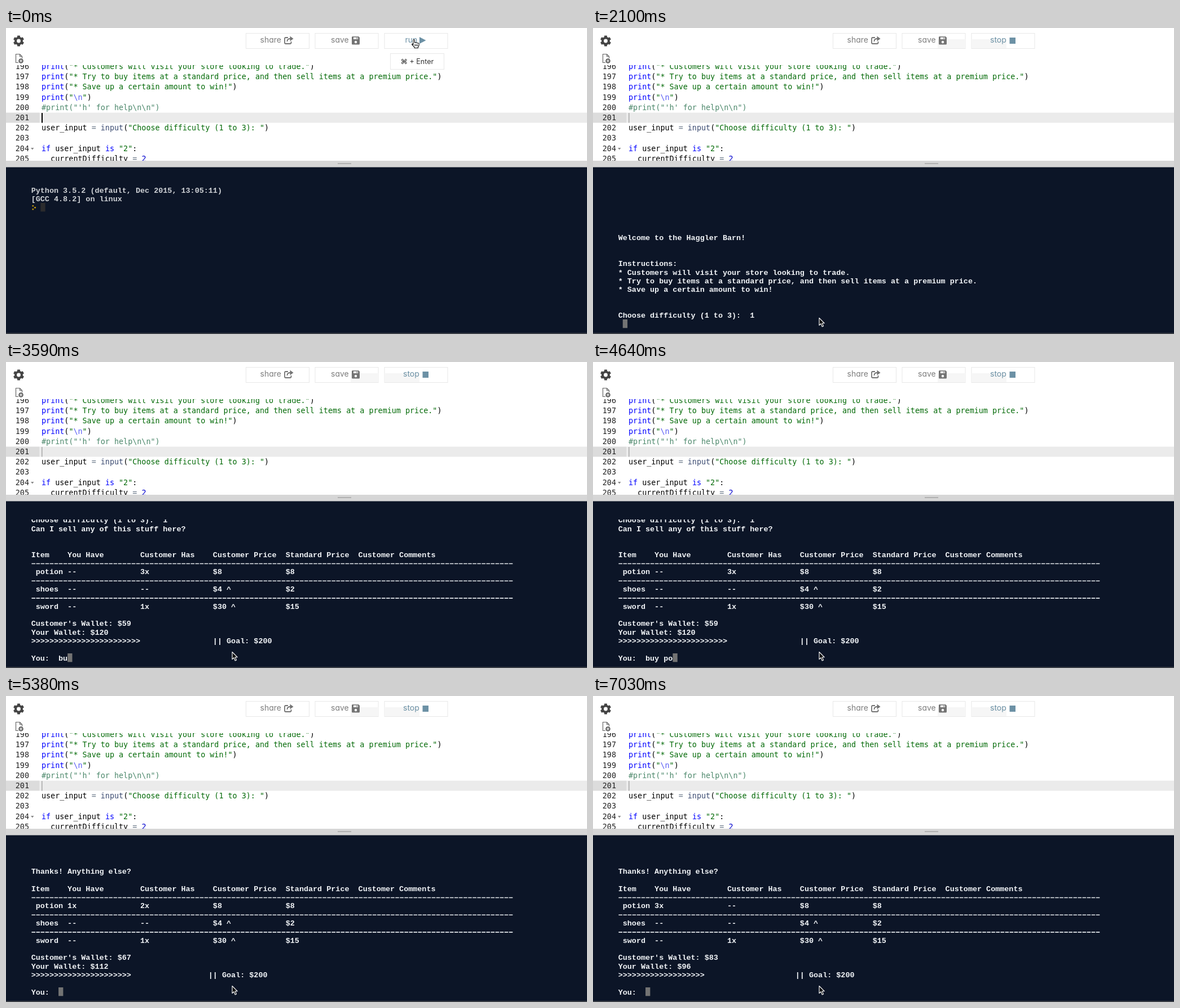
Animation, 1030 px wide and 544 px high, one loop 8 s. Source, as an HTML page:

```html
<!DOCTYPE html>
<html lang="en">
<head>
<meta charset="utf-8">
<title>Trading game in a code editor</title>
<style>
  html, body { margin: 0; width: 100%; height: 100%; overflow: hidden; background: #fff; }
  svg { display: block; width: 100vw; height: 100vh; }
  text { white-space: pre; }
  .code { font: 13.4px "DejaVu Sans Mono", monospace; fill: #000; }
  .num { text-anchor: end; fill: #222; }
  .key { fill: #00f; }
  .str { fill: #036a07; }
  .esc { fill: #585cf6; }
  .com { fill: #4c886b; }
  .fun { fill: #3c4c72; }
  .op { fill: #687687; }
  .lit { fill: #0000cd; }
  .term { font: bold 13.43px "Liberation Mono", monospace; fill: #f2f5f8; }
  .boot { fill: #cfd2d6; }
  .label { font: 14px Inter, sans-serif; font-feature-settings: "cv11"; fill: #7d7d7d; }
  .active { fill: #6c91a5; }
  .tip { font: 12.5px Inter, "DejaVu Sans", sans-serif; fill: #333; }
  .box { fill: #fff; stroke: #e8e8e8; }
</style>
</head>
<body>
<svg viewBox="0 0 1030 544" xmlns="http://www.w3.org/2000/svg">
  <defs>
    <clipPath id="editClip"><rect y="66" width="1030" height="170"/></clipPath>
    <clipPath id="termClip"><rect y="280" width="1030" height="262"/></clipPath>
  </defs>
  <rect width="1030" height="544" fill="#fff"/>

  <path id="gear" fill="#444" fill-rule="evenodd"/>
  <g fill="none" stroke="#666" stroke-width="1.2">
    <path d="M22 61.5H17.5V46.5H24.5L28.5 50.5V54M24.5 46.5V50.5H28.5"/>
    <circle cx="26.5" cy="58.5" r="4.3" fill="#666" stroke="none"/>
    <path d="M24 58.5H29M26.5 56V61" stroke="#fff"/>
  </g>

  <g class="box">
    <rect x="425.5" y="9.5" width="112" height="27"/>
    <rect x="548" y="9.5" width="112" height="27"/>
    <rect x="671" y="9.5" width="112" height="27"/>
  </g>
  <path id="shade" d="M611 20H660V36H611ZM671.5 20H733V36H671.5Z" fill="#f6f6f6"/>
  <text class="label" x="450.5" y="26">share</text>
  <g fill="none" stroke="#747474" stroke-width="1.8">
    <path d="M500 17H496Q494 17 494 19V26Q494 28 496 28H503.5Q505.5 28 505.5 26V24"/>
    <path d="M498.5 24Q498.5 19 504 19"/>
    <path d="M503.5 14.5L509.5 19L503.5 23.5Z" fill="#747474" stroke="none"/>
  </g>
  <text class="label" x="576" y="26">save</text>
  <path d="M614 15H625L627 17V28Q627 29.5 625.5 29.5H614.5Q613 29.5 613 28V16Z" fill="#747474"/>
  <path d="M616 16.5H624V20H616Z" fill="#fff"/>
  <path d="M621.5 17H623V19.5H621.5Z" fill="#747474"/>
  <circle cx="620" cy="25" r="2.2" fill="#fff"/>
  <g id="run">
    <text class="label active" x="707.5" y="26">run</text>
    <path d="M733 16L744.5 22L733 28Z" fill="#6c91a5"/>
  </g>
  <g id="stop">
    <text class="label active" x="704" y="26">stop</text>
    <rect x="738.5" y="17" width="10.5" height="11" fill="#6c91a5"/>
  </g>
  <g id="hint">
    <rect class="box" x="681.5" y="45.5" width="95" height="28"/>
    <text class="tip" x="699.5" y="63.5">⌘ + Enter</text>
  </g>

  <rect y="150.5" width="59" height="18" fill="#dcdcdc"/>
  <rect x="59" y="150.5" width="971" height="18" fill="#ebebeb"/>
  <g id="editor" clip-path="url(#editClip)"></g>
  <path d="M44 213H49.5L46.75 216.5Z" fill="#888"/>
  <rect id="caret" x="63" y="151" height="17.5"/>

  <rect y="236" width="1030" height="12" fill="#d6d6d6"/>
  <path d="M588 241H612" stroke="#8c8c8c"/>
  <rect y="247.5" width="1030" height="297" fill="#0c1527"/>
  <rect y="542" width="1030" height="2" fill="#3a3e45"/>
  <g id="terminal" clip-path="url(#termClip)"></g>

  <path id="hand" transform="translate(719 20)" fill="#fff" stroke="#111" stroke-width="1.1" stroke-linejoin="round"
    d="M3 9.5V1.8Q3 .5 4.2 .5T5.5 1.8V6Q6.5 5 8 6.3Q9.3 5.5 10.5 7Q13.3 6.3 13.3 9Q13.3 12 11.5 13.5V15.5H5V14L.8 9.5Q.3 8 1.5 8Z M6 9V12M8.3 9V12M10.5 9.3V12"/>
  <path id="arrow" fill="#111" stroke="#fff" stroke-width="1.1" stroke-linejoin="round"
    d="M.5 .5V13.5L3.5 10.7L5.7 16L8 15L5.8 9.8H9.8Z"/>
</svg>

<script>
const LOOP = 8000;
const CHAR = 8.06, ROW = 15.33, LEFT = 44.7, BOTTOM = 518;
const $ = id => document.getElementById(id);
const show = (id, on) => $(id).setAttribute("visibility", on ? "visible" : "hidden");

// Toolbar gear: six teeth around a hole, one pointing up
function gearPath(cx, cy) {
  const at = (r, a) => `${(cx + r * Math.cos(a)).toFixed(2)} ${(cy + r * Math.sin(a)).toFixed(2)}`;
  const points = [];
  for (let i = 0; i < 6; i++) {
    const a = i * Math.PI / 3 - Math.PI / 2;
    points.push(at(7.4, a - .36), at(9.8, a - .24), at(9.8, a + .24), at(7.4, a + .36));
  }
  return `M${points.join("L")}ZM${cx - 3.4} ${cy}a3.4 3.4 0 1 0 6.8 0a3.4 3.4 0 1 0 -6.8 0Z`;
}
$("gear").setAttribute("d", gearPath(22.5, 23));

// Editor
const span = (cls, s) => `<tspan class="${cls}">${s}</tspan>`;
const print = s => span("key", "print") + "(" + s + ")";
const code = [
  print(span("str", '"* Customers will visit your store looking to trade."')),
  print(span("str", '"* Try to buy items at a standard price, and then sell items at a premium price."')),
  print(span("str", '"* Save up a certain amount to win!"')),
  print(span("str", '"') + span("esc", "\\n") + span("str", '"')),
  span("com", `#print("'h' for help\\n\\n")`),
  "",
  `user_input ${span("op", "=")} ${span("fun", "input")}(${span("str", '"Choose difficulty (1 to 3): "')})`,
  "",
  `${span("key", "if")} user_input ${span("key", "is")} ${span("str", '"2"')}:`,
  `  currentDifficulty ${span("op", "=")} ${span("lit", "2")}`
];
$("editor").innerHTML = code.map((line, i) => {
  const y = 73 + 18.2 * i;
  return `<text class="code num" x="41" y="${y}">${196 + i}</text><text class="code" x="63" y="${y}">${line}</text>`;
}).join("");

// Console screens: lists of lines, the last one at the bottom
const RULE = "-".repeat(106);
const cells = (...parts) => parts.reduce((row, [col, s]) => row.padEnd(col) + s, "");
const question = "Choose difficulty (1 to 3):  ";
const intro = [
  "Welcome to the Haggler Barn!", "", "", "Instructions:",
  "* Customers will visit your store looking to trade.",
  "* Try to buy items at a standard price, and then sell items at a premium price.",
  "* Save up a certain amount to win!", "", ""
];

function shop(bought, typed) {
  const wallet = 120 - 8 * bought;
  const count = n => n ? n + "x" : "--";
  const item = (name, mine, theirs, price, usual) =>
    cells([1, name], [8, count(mine)], [24, count(theirs)], [40, price], [56, usual]);
  const greeting = bought
    ? ["Thanks! Anything else?", ""]
    : [question + "1", "Can I sell any of this stuff here?", "", ""];
  return [
    ...greeting,
    cells([0, "Item"], [8, "You Have"], [24, "Customer Has"], [40, "Customer Price"],
      [56, "Standard Price"], [72, "Customer Comments"]),
    RULE, item("potion", bought, 3 - bought, "$8", "$8"),
    RULE, item("shoes", 0, 0, "$4 ^", "$2"),
    RULE, item("sword", 0, 1, "$30 ^", "$15"),
    "",
    `Customer's Wallet: $${59 + 8 * bought}`,
    `Your Wallet: $${wallet}`,
    ">".repeat(wallet / 5) + " ".repeat((200 - wallet) / 5) + "|| Goal: $200",
    "",
    "You:  " + typed
  ];
}

const order = "buy potion";
const entered = lines => [...lines, " "];
const screens = [
  [0, null],
  [600, [...intro, question]],
  [1950, [...intro, question + "1"]],
  [2100, entered([...intro, question + "1"])],
  [2250, shop(0, "")],
  [3590, shop(0, "bu")],
  [3890, shop(0, "buy")],
  [4040, shop(0, "buy ")],
  [4640, shop(0, "buy po")],
  [4790, shop(0, "buy pot")],
  [4940, shop(0, "buy poti")],
  [5090, shop(0, order)],
  [5240, entered(shop(0, order))],
  [5380, shop(1, "")],
  [6130, shop(1, order)],
  [6280, entered(shop(1, order))],
  [6430, shop(2, "")],
  [6880, shop(2, order)],
  [7030, shop(3, "")]
];

const block = (x, y, fill) => `<rect x="${x}" y="${y}" width="8.3" height="15.3" fill="${fill}"/>`;

function drawLine(s, top) {
  if (s === RULE) {
    return `<path d="M${LEFT + .7} ${top + 9.2}H899" stroke="#e4e8ec" stroke-width="1.6" stroke-dasharray="6.6 ${CHAR - 6.6}"/>`;
  }
  return `<text class="term" x="${LEFT}" y="${top + 12.5}">${s}</text>`;
}

function bootScreen() {
  return ["Python 3.5.2 (default, Dec 2015, 13:05:11)", "[GCC 4.8.2] on linux"]
    .map((s, i) => `<text class="term boot" x="${LEFT}" y="${292.5 + i * ROW}">${s}</text>`).join("") +
    '<path d="M46.5 315H49V317.5H46.5ZM50 318H53V320.5H50ZM46.5 321H49V323.5H46.5Z" fill="#b8940f"/>' +
    block(61.3, 311, "#2b2b2d");
}

function consoleMarkup(lines) {
  if (!lines) return bootScreen();
  const last = lines.length - 1;
  return block(LEFT + lines[last].length * CHAR, BOTTOM, "#737373") +
    lines.map((s, i) => s.trim() ? drawLine(s, BOTTOM - (last - i) * ROW) : "").join("");
}

// Pointer stops: time, x, y
const stops = [
  [900, 611, 110], [1050, 450, 235], [1200, 347, 316],
  [1350, 400.5, 475.5], [1500, 401, 504], [1650, 400.5, 515]
];
const latest = (list, t) => list.filter(e => e[0] <= t).pop();

let shown;
function render(t) {
  const screen = latest(screens, t);
  if (screen !== shown) {
    shown = screen;
    $("terminal").innerHTML = consoleMarkup(screen[1]);
  }
  const running = t >= 450, moved = t >= 900;
  show("run", !running);
  show("stop", running);
  show("hint", !moved);
  show("hand", !moved);
  show("shade", moved);
  show("arrow", moved);
  $("caret").setAttribute("width", running ? 1.5 : 2);
  $("caret").setAttribute("fill", running ? "#a8a8a8" : "#000");
  if (moved) {
    const [, x, y] = latest(stops, t);
    $("arrow").setAttribute("transform", `translate(${x} ${y})`);
  }
}

const start = performance.now();
function tick() {
  render((performance.now() - start) % LOOP);
  requestAnimationFrame(tick);
}
tick();
</script>
</body>
</html>
```
